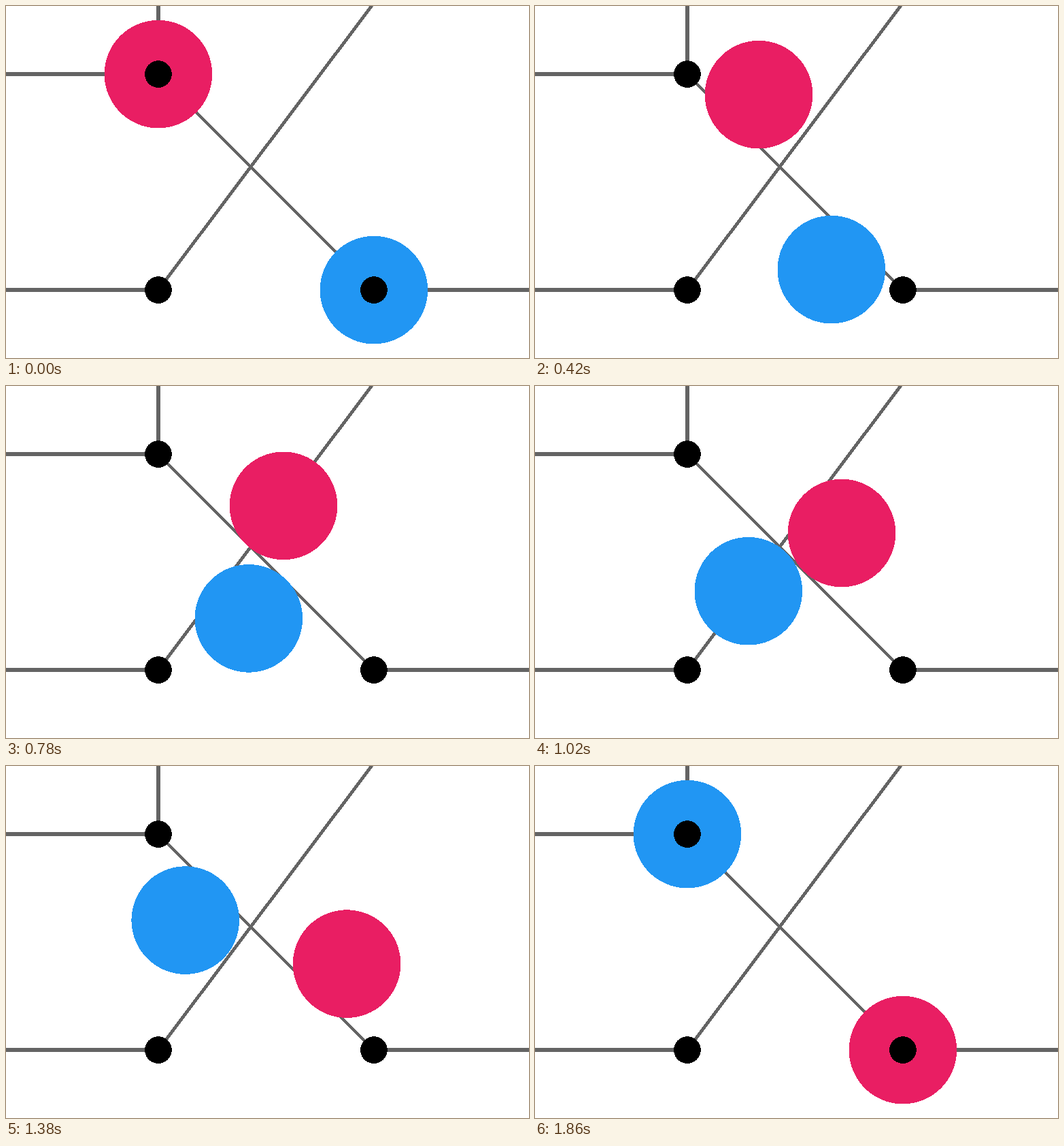
Animation of 769x517 px, one loop 1.89 s. Source, as an HTML page with a canvas:

```html
<!DOCTYPE html>
<html lang="en">
<head>
<meta charset="utf-8">
<title>Swapping discs</title>
<style>
html, body { margin: 0; width: 100%; height: 100%; overflow: hidden; background: #fff; }
canvas { display: block; }
</style>
</head>
<body>
<canvas id="stage" width="769" height="517"></canvas>
<script>
const W = 769, H = 517;
const LOOP = 1890, STEP = 30, STEPS = 61;
const LEFT = 223.9, TOP = 100.1, SPAN = 317;
const RIGHT = LEFT + SPAN, BOTTOM = TOP + SPAN;
const DISC = SPAN / 4, DOT = SPAN / 16, LINE = 6;
const BEND = 270.5; // control point offset of the curved path
const ctx = document.getElementById('stage').getContext('2d');

// first pixel whose centre lies at or past v
const edge = v => Math.ceil(v - 0.5);

// hard-edged disc, row by row
function disc(cx, cy, r, color) {
  ctx.fillStyle = color;
  for (let y = edge(cy - r); y < edge(cy + r); y++) {
    const dy = y + 0.5 - cy;
    const half = Math.sqrt(Math.max(0, r * r - dy * dy));
    const x = edge(cx - half);
    ctx.fillRect(x, y, edge(cx + half) - x, 1);
  }
}

// hard-edged line, its width measured along the minor axis
function line(x1, y1, x2, y2) {
  const flat = Math.abs(x2 - x1) > Math.abs(y2 - y1);
  let [a1, b1, a2, b2] = flat ? [x1, y1, x2, y2] : [y1, x1, y2, x2];
  if (a1 > a2) [a1, b1, a2, b2] = [a2, b2, a1, b1];
  for (let a = edge(a1); a < edge(a2); a++) {
    const mid = b1 + (b2 - b1) * (a + 0.5 - a1) / (a2 - a1);
    const b = edge(mid - LINE / 2);
    if (flat) ctx.fillRect(a, b, 1, LINE);
    else ctx.fillRect(b, a, LINE, 1);
  }
}

// quadratic curve across the square, as an offset from the start
function travel(u) {
  const pull = 2 * u * (1 - u), end = u * u * SPAN;
  return [pull * BEND + end, pull * (SPAN - BEND) + end];
}

function draw(ms) {
  const step = Math.max(0, Math.floor(ms / STEP) - 1);
  const [dx, dy] = travel(step / STEPS);

  ctx.fillStyle = '#fff';
  ctx.fillRect(0, 0, W, H);

  ctx.fillStyle = '#646464';
  line(0, TOP, LEFT, TOP);
  line(LEFT, 0, LEFT, TOP);
  line(0, BOTTOM, LEFT, BOTTOM);
  line(RIGHT, BOTTOM, W, BOTTOM);
  line(LEFT, TOP, RIGHT, BOTTOM);
  line(LEFT, BOTTOM, 537.5, 0);

  disc(LEFT + dx, TOP + dy, DISC, '#e91e63');
  disc(RIGHT - dx, BOTTOM - dy, DISC, '#2196f3');

  disc(LEFT, TOP, DOT, '#000');
  disc(LEFT, BOTTOM, DOT, '#000');
  disc(RIGHT, BOTTOM, DOT, '#000');
}

const start = performance.now();
function tick() {
  draw((performance.now() - start) % LOOP);
  requestAnimationFrame(tick);
}
tick();
</script>
</body>
</html>
```
